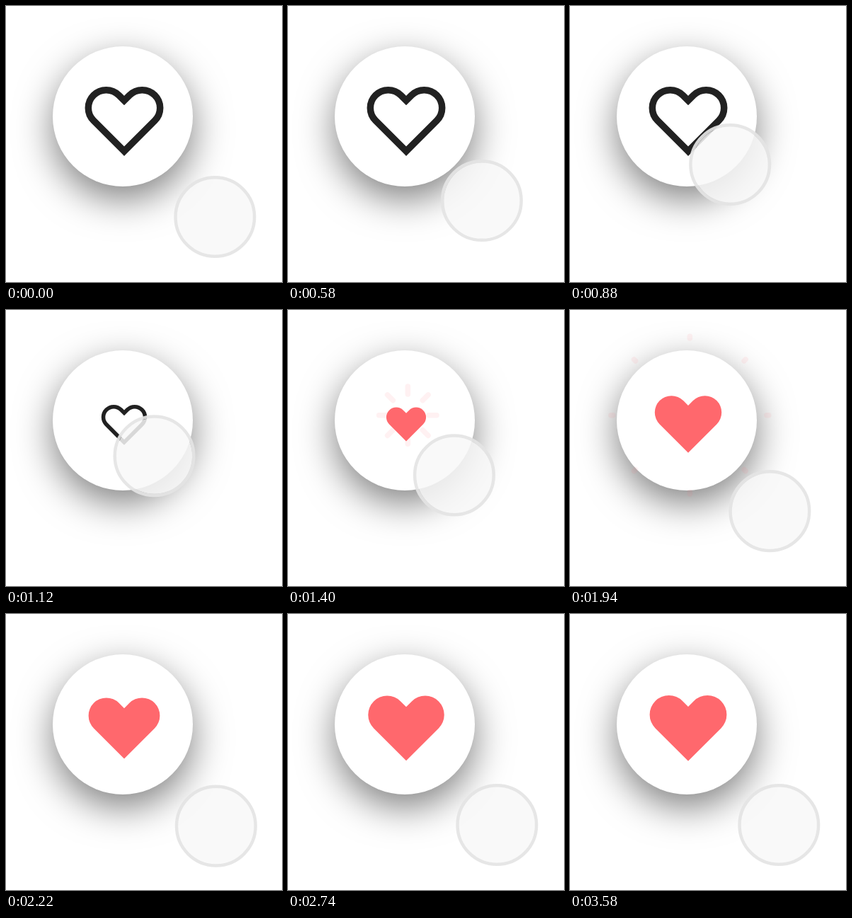
An HTML page with a canvas that plays this animation: 390 px wide and 390 px high, repeating every 3.6 s.

```html
<!DOCTYPE html>
<html lang="en">
<head>
<meta charset="utf-8">
<title>Like button</title>
<style>
  html, body { margin: 0; width: 100%; height: 100%; overflow: hidden; background: #fff; }
  canvas { display: block; width: 100vw; height: 100vh; }
</style>
</head>
<body>
<canvas id="stage" width="390" height="390"></canvas>
<script>
const ctx = document.getElementById('stage').getContext('2d');
const LOOP = 3600;
const SWAP = 1200; // outline gives way to the filled heart
const RED = '#ff686d';
const HEART = { x: 167, y: 161.6 };

// Smooth monotone curve through [time, value] keys
function track(...keys) {
  const n = keys.length;
  const slope = i => (keys[i + 1][1] - keys[i][1]) / (keys[i + 1][0] - keys[i][0]);
  const tangent = keys.map((_, i) => {
    if (i === 0) return slope(0);
    if (i === n - 1) return slope(n - 2);
    const a = slope(i - 1), b = slope(i);
    return a * b <= 0 ? 0 : 2 * a * b / (a + b);
  });
  return t => {
    if (t <= keys[0][0]) return keys[0][1];
    if (t >= keys[n - 1][0]) return keys[n - 1][1];
    let i = 0;
    while (t >= keys[i + 1][0]) i++;
    const [t0, v0] = keys[i], [t1, v1] = keys[i + 1];
    const h = t1 - t0, u = (t - t0) / h, w = 1 - u;
    return v0 * (1 + 2 * u) * w * w + h * tangent[i] * u * w * w
         + v1 * u * u * (3 - 2 * u) - h * tangent[i + 1] * u * u * w;
  };
}

const reach = track([0, 0], [330, 0], [1100, 86], [1400, 60.5], [1720, 29.5],
  [1940, 13], [2220, -1.5], [2460, 0], [LOOP, 0]);
const outlineScale = track([0, 1], [980, 1], [SWAP, 0.25]);
const fillScale = track([SWAP, 0.25], [1400, 0.515], [1720, 0.795],
  [2220, 0.926], [2740, 0.988], [3100, 0.997], [3590, 1]);
const rayRadius = track([SWAP, 0], [1400, 35], [1720, 86], [1880, 108], [1980, 111]);
const rayAlpha = track([SWAP, 0], [1400, 0.09], [1720, 0.22], [1880, 0.18], [1980, 0]);
const rayLength = track([1400, 11], [1800, 11], [1980, 0]);

function disc(x, y, r) {
  ctx.beginPath();
  ctx.arc(x, y, r, 0, Math.PI * 2);
}

// Two half-circle lobes joined by 45 degree lines
function heartPath(cy, gap, r) {
  const x = HEART.x, k = r * Math.SQRT1_2;
  ctx.beginPath();
  ctx.moveTo(x, cy + gap + 2 * k);
  ctx.arc(x - gap, cy, r, Math.PI * 0.75, Math.PI * 1.75);
  ctx.lineTo(x, cy + gap - 2 * k);
  ctx.arc(x + gap, cy, r, Math.PI * 1.25, Math.PI * 2.25);
  ctx.closePath();
}

function drawButton() {
  ctx.save();
  ctx.shadowColor = 'rgba(0, 0, 0, 0.5)';
  ctx.shadowBlur = 52;
  ctx.shadowOffsetY = 18;
  ctx.fillStyle = '#fff';
  disc(165, 156, 99);
  ctx.fill();
  ctx.restore();
}

function drawRays(t) {
  const alpha = rayAlpha(t);
  if (alpha <= 0) return;
  const r = rayRadius(t), half = rayLength(t) / 2;
  ctx.save();
  ctx.globalAlpha = alpha;
  ctx.strokeStyle = RED;
  ctx.lineWidth = 7.5;
  ctx.lineCap = 'round';
  ctx.translate(169.3, 148.7);
  ctx.beginPath();
  for (let i = 0; i < 8; i++) {
    const c = Math.cos(i * Math.PI / 4), s = Math.sin(i * Math.PI / 4);
    ctx.moveTo(c * (r - half), s * (r - half));
    ctx.lineTo(c * (r + half), s * (r + half));
  }
  ctx.stroke();
  ctx.restore();
}

function drawHeart(t) {
  const filled = t >= SWAP;
  const scale = filled ? fillScale(t) : outlineScale(t);
  ctx.save();
  ctx.translate(HEART.x, HEART.y);
  ctx.scale(scale, scale);
  ctx.translate(-HEART.x, -HEART.y);
  if (filled) {
    heartPath(142.2, 27.2, 27.2);
    ctx.fillStyle = RED;
    ctx.fill();
  } else {
    heartPath(144, 25.4, 25.3);
    ctx.strokeStyle = '#212121';
    ctx.lineWidth = 9.5;
    ctx.stroke();
  }
  ctx.restore();
}

function drawPointer(t) {
  const d = reach(t);
  const x = 295.3 - d, y = 298 - d * 1.07;
  disc(x, y, 53.6);
  ctx.fillStyle = 'rgba(248, 248, 248, 0.85)';
  ctx.fill();
  disc(x, y, 55.8);
  ctx.strokeStyle = 'rgba(228, 228, 228, 0.92)';
  ctx.lineWidth = 4.5;
  ctx.stroke();
}

function draw(t) {
  ctx.fillStyle = '#fff';
  ctx.fillRect(0, 0, 390, 390);
  drawButton();
  drawRays(t);
  drawHeart(t);
  drawPointer(t);
}

const start = performance.now();
function tick() {
  draw((performance.now() - start) % LOOP);
  requestAnimationFrame(tick);
}
tick();
</script>
</body>
</html>
```
